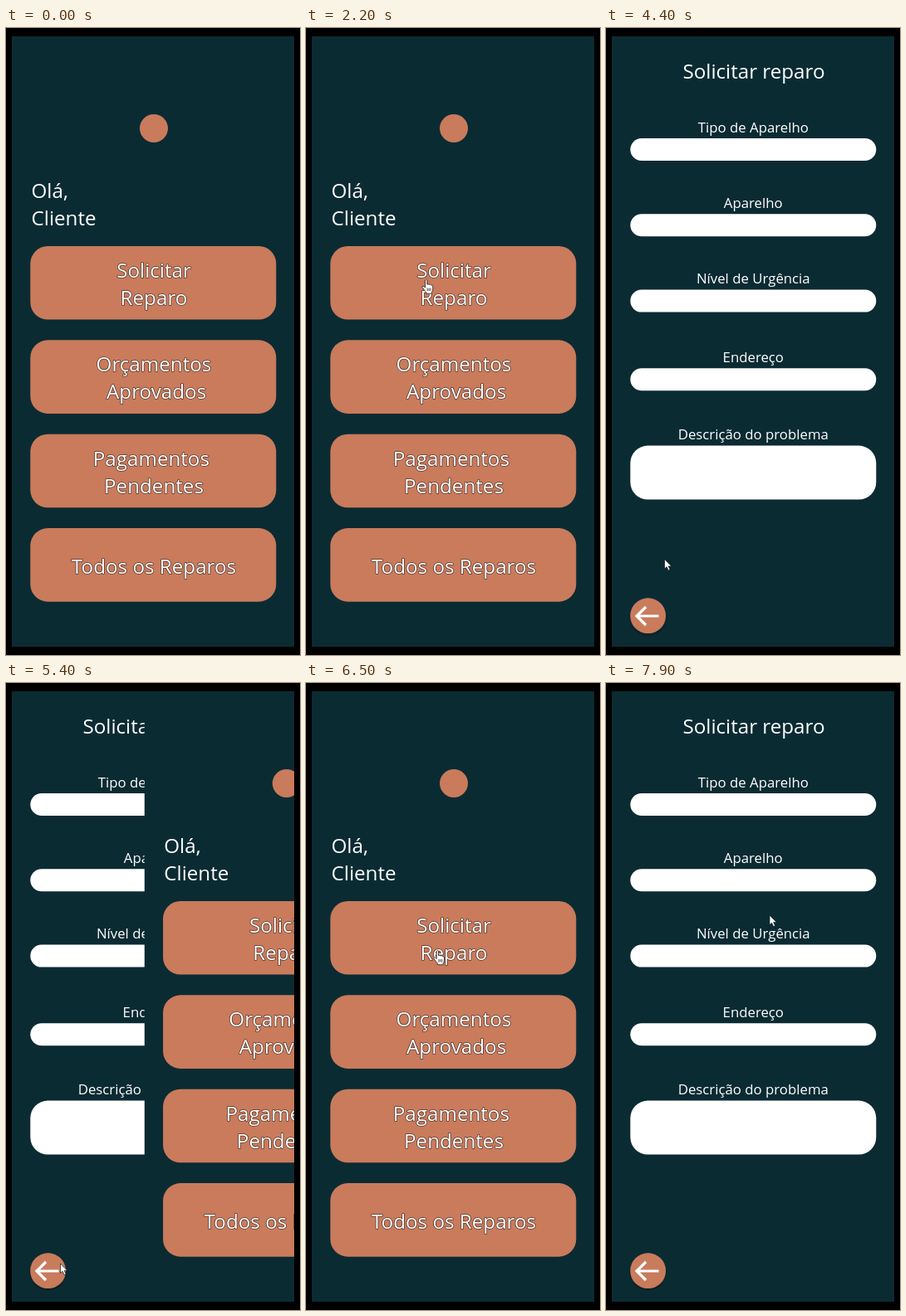
Recreate the animation shown at these times as an HTML page. Size 354x756 px, loop 8000 ms.

```html
<!DOCTYPE html>
<html lang="pt-BR">
<head>
<meta charset="utf-8">
<title>Solicitar reparo</title>
<style>
  html, body { margin: 0; width: 100%; height: 100%; overflow: hidden; background: #000; }
  svg { display: block; width: 354px; height: 756px; }
  text {
    font-family: "Open Sans", "Noto Sans", sans-serif; font-weight: 500;
    fill: #fff; text-anchor: middle; white-space: pre;
  }
  .big { font-size: 24.2px; }
  .small { font-size: 16.8px; }
  .start { text-anchor: start; }
  .edged { stroke: #54352b; stroke-width: 1.5px; stroke-linejoin: round; paint-order: stroke; }
  .page { fill: #0b2b33; }
  .clay { fill: #c97b5c; }
</style>
</head>
<body>
<svg viewBox="0 0 354 756">
  <defs>
    <clipPath id="screen"><rect x="7" y="10" width="340" height="736"/></clipPath>
    <filter id="soft" x="-30%" y="-30%" width="160%" height="160%">
      <feDropShadow dx="0" dy="2" stdDeviation="1.5" flood-color="#000" flood-opacity=".35"/>
    </filter>
  </defs>
  <g id="stack" clip-path="url(#screen)">
    <g id="home"><rect class="page" x="7" y="10" width="340" height="736"/></g>
    <g id="form"><rect class="page" x="7" y="10" width="340" height="736"/></g>
  </g>
  <g id="cursor">
    <path id="arrow" d="M0 0V11.6L2.6 9.2L4.6 13.6L6.6 12.7L4.7 8.4H8.3Z"
      fill="#fff" stroke="#06191e" stroke-width=".7"/>
    <g id="hand" transform="translate(-.8 0)" stroke="#2b1a15" stroke-width=".8" stroke-linejoin="round">
      <path fill="#fff" d="M-1 1Q0-.9 1.3 1V6.2Q2.6 5 3.8 6.4Q5.2 5.5 6.2 7Q8.2 6.4 8.2 8.6V12
        Q8.2 14 7 15.4V17.2H.2V15.6Q-2 13.4-4.5 9.4Q-4.6 7.4-2.4 8.6L-1 10.2Z"/>
      <path fill="none" d="M1.7 10.5V14M3.6 10.5V14M5.5 10.5V14"/>
    </g>
  </g>
</svg>
<script>
const $ = id => document.getElementById(id);
const stack = $('stack'), pages = { home: $('home'), form: $('form') };
const LOOP = 8000, TICK = 100, WIDTH = 340, SLIDE = 300;
const button = { x: 29.3, y: 263, width: 296, height: 88.6, step: 113.35 };
const back = { cx: 50.6, cy: 708.7, r: 21.4 };

function add(parent, tag, attrs, text) {
  const el = document.createElementNS('http://www.w3.org/2000/svg', tag);
  for (const key in attrs) el.setAttribute(key, attrs[key]);
  if (text) el.textContent = text;
  parent.append(el);
}
const label = (page, cls, x, y, text) => add(page, 'text', { class: cls, x, y }, text);

function buildHome(page) {
  add(page, 'circle', { class: 'clay', cx: 178, cy: 121, r: 17 });
  label(page, 'big start', 30.5, 205, 'Olá,');
  label(page, 'big start', 30.5, 238, 'Cliente');
  [
    ['Solicitar', 'Reparo'],
    ['Orçamentos', '\u00a0Aprovados'],
    ['Pagamentos\u00a0', 'Pendentes'],
    ['Todos os Reparos']
  ].forEach((lines, i) => {
    const { x, width, height, step } = button, y = button.y + i * step;
    add(page, 'rect', { class: 'clay', x, y, width, height, rx: 21 });
    const first = y + 54.5 - 16.5 * (lines.length - 1);
    lines.forEach((text, n) => label(page, 'big edged', 178, first + n * 33, text));
  });
}

function buildForm(page) {
  label(page, 'big', 178, 61, 'Solicitar reparo');
  const fields = {
    'Tipo de Aparelho': 133, 'Aparelho': 224.3, 'Nível de Urgência': 315.6,
    'Endereço': 410.2, 'Descrição do problema': 503.6
  };
  for (const [text, y] of Object.entries(fields)) {
    const tall = text.startsWith('Descrição');
    label(page, 'small', 177.3, y - 7.4, text);
    add(page, 'rect', {
      x: button.x, y, width: button.width, height: tall ? 65 : 27, rx: tall ? 21 : 13.5, fill: '#fff'
    });
  }
  add(page, 'circle', { class: 'clay', ...back, filter: 'url(#soft)' });
  add(page, 'path', {
    d: 'M63.5 709H38M48 698L37 709L48 720', fill: 'none', stroke: '#fff', 'stroke-width': 3.2
  });
}

// Ease in-out with a pull back and an overshoot: cubic-bezier(.7, -.4, .4, 1.4)
function ease(x) {
  if (x <= 0 || x >= 1) return x <= 0 ? 0 : 1;
  const curve = (u, a, b) => 3 * (1 - u) ** 2 * u * a + 3 * (1 - u) * u * u * b + u ** 3;
  let low = 0, high = 1;
  for (let i = 0; i < 24; i++) {
    const mid = (low + high) / 2;
    if (curve(mid, .7, .4) < x) low = mid; else high = mid;
  }
  return curve(low, -.4, 1.4);
}

const slides = [
  { at: 2571, page: 'form' }, { at: 5236.5, page: 'home' }, { at: 7145, page: 'form' }
];

// Pointer moves: each bends towards a point and ends at another
const moves = [
  { from: 1200, until: 2200, bend: [240, 95], end: [145.3, 303] },
  { from: 3500, until: 4400, bend: [215, 500], end: [70.5, 640.5] },
  { from: 4400, until: 5300, bend: [40, 680], end: [65.5, 700] },
  { from: 5600, until: 6500, bend: [110, 480], end: [159, 322.5] },
  { from: 6500, until: 6900, bend: [178, 300], end: [197, 280] }
];

function pointerAt(t) {
  let spot = [-10, 490];
  for (const { from, until, bend, end } of moves) {
    if (t < from) break;
    const k = Math.min(1, (t - from) / (until - from)), u = k * k * (3 - 2 * k);
    spot = spot.map((p, i) => (1 - u) ** 2 * p + 2 * u * (1 - u) * bend[i] + u * u * end[i]);
  }
  return spot;
}

function overTarget(page, x, y) {
  if (page === 'form') return Math.hypot(x - back.cx, y - back.cy) < back.r;
  const dx = x - button.x, dy = y - button.y;
  return dx > 0 && dx < button.width && dy > 0 && dy < 4 * button.step
    && dy % button.step < button.height;
}

function draw(now) {
  const t = Math.floor((now % LOOP) / TICK) * TICK;
  let top = 'home', left = 0, moving = false;
  for (const { at, page } of slides) {
    if (t < at) break;
    top = page;
    left = WIDTH * (1 - ease((t - at) / SLIDE));
    moving = t < at + SLIDE;
  }
  const under = top === 'home' ? 'form' : 'home';
  if (stack.lastElementChild !== pages[top]) stack.append(pages[top]);
  pages[top].setAttribute('transform', `translate(${left} 0)`);
  pages[under].removeAttribute('transform');

  const [x, y] = pointerAt(t);
  const hand = !moving && overTarget(top, x, y);
  $('cursor').setAttribute('transform', `translate(${x} ${y})`);
  $('cursor').style.display = t < 1300 ? 'none' : '';
  $('hand').style.display = hand ? '' : 'none';
  $('arrow').style.display = hand ? 'none' : '';
}

buildHome(pages.home);
buildForm(pages.form);
const start = performance.now();
function frame() {
  draw(performance.now() - start);
  requestAnimationFrame(frame);
}
frame();
</script>
</body>
</html>
```
